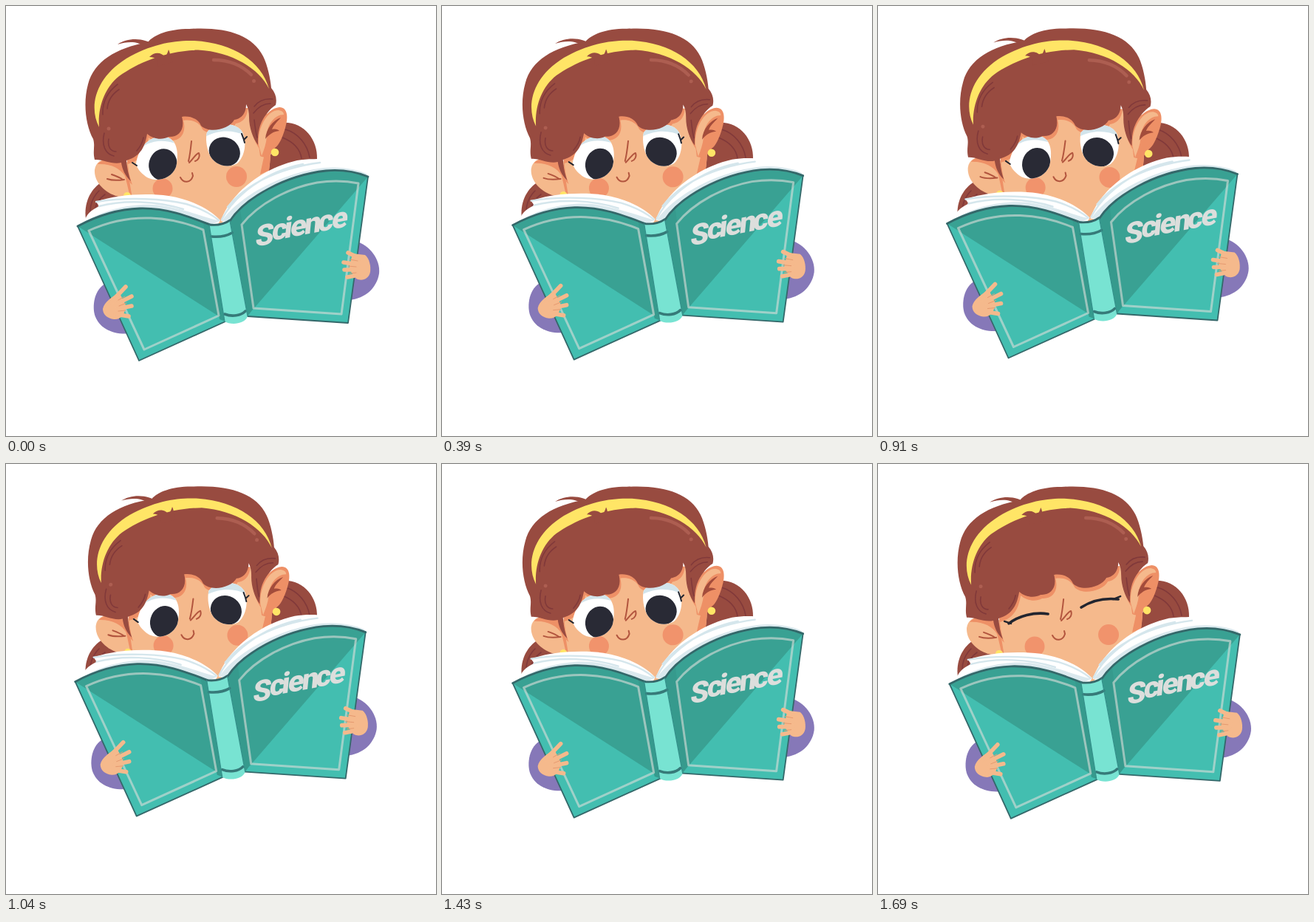
An HTML page that plays this animation: 582x582 px, repeating every 1.82 s.

```html
<!DOCTYPE html>
<html lang="en">
<head>
<meta charset="utf-8">
<title>Reading girl</title>
<style>
  html, body { margin: 0; width: 100%; height: 100%; overflow: hidden; background: #fff; }
  svg { display: block; width: 100vw; height: 100vh; }
  .hair { fill: #984b40; }
  .skin { fill: #f5b98c; }
  .shade { fill: #ee9066; }
  .yellow { fill: #ffe566; }
  .ink { fill: #292a35; }
  .sleeve { fill: #8678b8; }
  .bright { fill: #43beb0; }
  .dark { fill: #39a193; }
  .hinge { fill: #369a8d; }
  .line { fill: none; stroke-linecap: round; stroke-linejoin: round; }
  .strand { stroke: #81393a; stroke-width: 1.6; }
  .feature { stroke: #b2553e; stroke-width: 2; }
  .lash { stroke: #22252f; stroke-width: 3.6; }
  .edge { stroke: #34686a; stroke-width: 2.8; }
  .frame { stroke: #d8ded8; stroke-opacity: .62; stroke-width: 3; }
  .page { stroke: #d5e6ec; stroke-width: 2.4; }
  .finger { stroke: #f5b98c; stroke-width: 5.6; }
  .gap { stroke: #e59a70; stroke-width: 1; }
  text { font: 800 40px Roboto, "Open Sans", sans-serif; font-stretch: 75%; fill: #dcdedc; }
</style>
</head>
<body>
<svg viewBox="0 0 582 582">
  <defs>
    <path id="face" d="M163 200 C165 225 168 245 172 264 L290 296 L356 222 C360 195 358 165 352 140 L200 130Z"/>
    <path id="hair" d="M120 208 C117 196 121 190 118 180 C108 162 104 132 111 106 C119 75 148 57 192 49
      C200 39 220 31 248 31 C296 28 333 38 348 68 C354 80 358 99 359 111 C365 118 367 126 365 134
      C357 139 348 150 345 162 C342 171 341 180 341 188 C334 179 329 164 329 151 C329 144 328 138 325 133
      C325 148 316 153 309 154 C302 167 275 173 264 162 C260 152 248 148 238 150
      C243 168 233 178 220 177 C211 182 199 180 191 173 C188 190 183 203 163 209
      C164 221 166 229 169 237 C161 230 157 220 156 212 C143 215 131 207 120 208Z"/>
    <clipPath id="faceClip"><use href="#face"/></clipPath>
    <path id="eyeL" d="M176 214 C179 192 194 174 215 177 C231 179 235 198 230 218 C223 236 199 240 187 229 C181 224 178 220 176 214Z"/>
    <path id="eyeR" d="M272 171 C284 157 311 156 320 171 C327 187 322 205 313 213 C299 221 281 215 275 200 C271 190 270 179 272 171Z"/>
    <clipPath id="clipL"><use href="#eyeL"/></clipPath>
    <clipPath id="clipR"><use href="#eyeR"/></clipPath>
    <path id="coverL" d="M97 298 C123 284 151 275 181 274 C219 273 250 286 276 296 L297 427 L180 480Z"/>
    <path id="coverR" d="M303 291 C323 260 378 229 433 223 C456 221 475 225 490 231 L463 429 L327 420Z"/>
    <clipPath id="cutL"><use href="#coverL"/></clipPath>
    <clipPath id="cutR"><use href="#coverR"/></clipPath>
  </defs>

  <!-- pigtails -->
  <path class="hair" d="M372 158 C402 155 422 180 421 207 L345 226 L362 194Z"/>
  <path class="line strand" d="M378 167 C396 172 408 188 411 205 M374 178 C389 184 398 194 400 206"/>
  <path class="hair" d="M130 238 C115 247 105 266 108 288 L176 268 L160 246Z"/>
  <path class="line strand" d="M126 250 C117 259 114 268 114 278 M134 255 C126 261 122 267 121 274"/>

  <g id="head">
    <path class="skin" d="M168 213 C148 204 122 203 120 222 C119 240 136 254 152 258 L174 262Z"/>
    <path class="shade" d="M166 217 C150 206 130 205 124 214 C142 213 155 220 161 230 C165 244 166 253 169 259 L174 260Z"/>
    <path class="line feature" d="M137 234 C145 237 153 236 160 235 M143 228 C149 230 154 232 158 235"/>
    <circle class="yellow" cx="164" cy="257" r="5"/>
    <use href="#face" class="skin"/>
    <g clip-path="url(#faceClip)">
      <use href="#hair" class="shade" transform="translate(2 5)"/>
      <path class="shade" d="M352 184 C351 199 347 212 344 228 L362 220 L362 180Z"/>
    </g>
    <circle cx="212" cy="247" r="13.5" fill="#f1936c"/>
    <circle cx="312" cy="231" r="14" fill="#f1936c"/>

    <g id="open">
      <use href="#eyeL" fill="#fff"/>
      <g clip-path="url(#clipL)">
        <path d="M174 200 C190 182 210 178 236 188 L236 168 L174 168Z" fill="#d2e4eb"/>
        <ellipse class="ink" cx="212.5" cy="214.5" rx="19" ry="21.5" transform="rotate(14 212 214)"/>
      </g>
      <use href="#eyeR" fill="#fff"/>
      <g clip-path="url(#clipR)">
        <path d="M268 178 C284 168 306 166 325 176 L325 152 L268 152Z" fill="#d2e4eb"/>
        <ellipse class="ink" cx="296" cy="197.5" rx="21.5" ry="19.5" transform="rotate(28 296 197)"/>
      </g>
      <path class="line lash" style="stroke-width:2" d="M171 212 L177 216 M319 173 Q322 180 323 185 M322 181 L326 177"/>
    </g>
    <g id="shut">
      <path class="line lash" d="M177 216 C190 206 211 200 230 203 M275 194 C289 185 307 181 325 183"/>
      <path class="line lash" style="stroke-width:2.4" d="M171 213 L180 216 M318 183 L328 179"/>
    </g>

    <path class="line feature" d="M251 183 C250 193 249 202 247 210 M248 212 C254 206 257 200 261 199 C263 204 260 209 256 210"/>
    <path class="line feature" d="M236 232 C240 240 250 240 253 230 L252 226"/>

    <use href="#hair" class="hair"/>
    <path class="hair" d="M151 52 C164 43 187 42 202 54 L188 55 C178 47 164 48 151 52Z"/>
    <path class="yellow" d="M126 164 C112 137 120 98 163 71 C197 51 229 46 255 47 C308 50 346 75 356 112 C343 85 306 62 260 59.5 C215 61 178 77 153 95 C133 111 124 138 126 164Z"/>
    <path class="hair" d="M194 69 C201 61 211 63 215 69 C217 67 219 63 220 59 C223 64 221 69 226 76 L204 82 C207 74 203 69 194 69Z"/>
    <path class="line strand" d="M131 147 C130 130 138 116 151 106 M137 139 C138 128 144 119 153 113
      M133 172 C129 188 134 200 146 203 M139 180 C137 191 142 197 149 197 M177 196 C182 190 185 185 186 178
      M336 136 C342 128 351 125 361 126 M335 145 C342 136 350 132 358 132 M336 154 C337 164 338 171 340 178"/>
    <circle cx="139" cy="166" r="2.5" fill="#ad5e51"/>
    <path class="line" d="M281 73 C302 73 320 81 332 93" stroke="#ad5e51" stroke-width="4.5"/>
    <circle cx="335.5" cy="101.5" r="2.5" fill="#ad5e51"/>

    <path class="shade" d="M342 188 C338 164 351 139 370 137 C382 137 382 152 378 165 C374 179 369 189 364 192 C360 202 350 207 344 203Z"/>
    <path class="skin" d="M342 188 C340 166 353 141 369 141 C374 142 376 144 376 147 C364 147 353 160 353 177 C352 187 349 195 346 203Z"/>
    <path d="M351 180 C352 166 361 155 372 151 C366 158 362 161 360 167 C365 166 368 167 370 169 C361 170 356 174 351 180Z" fill="#a34c3b"/>
    <circle class="yellow" cx="364" cy="198" r="5.3"/>
  </g>

  <g id="book">
    <path class="sleeve" d="M139 374 C121 379 116 403 120 418 C126 437 146 446 170 443 L165 400Z"/>
    <path class="sleeve" d="M472 318 C492 323 507 343 505 362 C502 381 487 396 464 398Z"/>

    <!-- pages -->
    <path d="M107 291 C108 283 114 277 126 271 L122 265 C150 255 190 253 220 257 C251 262 276 275 290 290 L284 300 L180 282Z" fill="#fff"/>
    <path d="M107 292 C135 274 180 264 216 271 C245 276 268 286 289 291 L276 297 C240 281 205 272 181 274 C151 275 130 281 107 292Z" fill="#dbe9ee"/>
    <path class="line page" d="M122 265 C165 258 215 261 244 268 C264 274 278 282 288 290 M126 271 C160 262 205 264 240 275"/>
    <path d="M291 291 C299 263 337 222 394 209 C431 203 466 214 487 225 L489 232 L440 226 L303 294Z" fill="#fff"/>
    <path d="M292 291 C315 258 372 226 430 219 C454 217 475 221 488 227 L489 232 C470 224 450 221 433 223 C378 229 323 260 303 291Z" fill="#dbe9ee"/>
    <path class="line page" d="M292 289 C308 258 350 224 402 214 M300 272 C322 244 365 220 425 212"/>

    <!-- left cover -->
    <use href="#coverL" class="bright"/>
    <g clip-path="url(#cutL)">
      <path class="dark" d="M97 298 L296 425 L310 260 L97 260Z"/>
      <path class="hinge" d="M266 288 L276 296 L297 427 L289 424Z"/>
    </g>
    <path class="line frame" d="M112 304 C138 292 168 286 196 287 C225 288 248 295 267 303 L288 419 L187 465Z"/>
    <path class="line edge" d="M276 296 C250 286 219 273 181 274 C151 275 123 284 97 298"/>
    <path class="line edge" style="stroke-width:1.8" d="M97 298 L180 480 L297 427"/>

    <!-- right cover -->
    <use href="#coverR" class="bright"/>
    <g clip-path="url(#cutR)">
      <path class="dark" d="M490 231 L328 418 L290 420 L290 200 L490 200Z"/>
      <path class="hinge" d="M303 291 L317 275 L335 408 L327 420Z"/>
    </g>
    <path class="line frame" d="M319 296 C342 267 383 246 421 239 C442 236 462 237 477 240 L454 417 L335 409Z"/>
    <path class="line edge" d="M303 291 C323 260 378 229 433 223 C456 221 475 225 490 231"/>
    <path class="line edge" style="stroke-width:1.8" d="M490 231 L463 429 L327 420"/>
    <text transform="matrix(1 -.19 -.1 1 337 322)" x="0 22 38.5 47 66 84.5 103" y="4 0">Science</text>

    <!-- spine -->
    <path d="M275 296 C285 297 296 295 303 290 L327 420 C323 431 304 432 296 427Z" fill="#78e3d2"/>
    <path class="line edge" d="M275 296 C285 297 296 295 303 290"/>
    <path class="line" d="M278 312 C288 313 299 311 306 307 M296 417 C306 421 318 419 324 413" stroke="#367a79" stroke-width="3.6"/>
    <path class="line" d="M275 296 L296 427 M303 291 L327 420" stroke="#34908a" stroke-width="1.2"/>

    <!-- hands -->
    <path class="skin" d="M131 410 C133 400 144 394 153 387 L162 405 C162 417 155 425 146 424 C138 423 131 418 131 410Z"/>
    <path class="line finger" d="M142 401 L162 380 M148 404 L170 393 M150 410 L170 406 M148 417 L166 420"/>
    <path class="line gap" d="M152 398 L161 393 M153 406 L163 402 M152 413 L162 412"/>
    <path class="skin" d="M469 335 L486 337 C492 342 494 352 493 360 C491 370 481 373 474 369 L464 356Z"/>
    <path class="line finger" d="M480 342 L463 334 M477 350 L457 347 M476 357 L458 357 M477 364 L462 367"/>
    <path class="line gap" d="M476 345 L465 343 M474 353 L463 352 M474 361 L465 362"/>
  </g>
</svg>
<script>
  const LOOP = 1820, STEP = 130, COUNT = LOOP / STEP;
  const el = id => document.getElementById(id);
  const head = el('head'), book = el('book'), open = el('open'), shut = el('shut');
  const start = performance.now();

  function draw(ms) {
    const pose = Math.floor((ms % LOOP) / STEP);
    const sway = (1 - Math.cos(2 * Math.PI * pose / COUNT)) / 2;
    const blink = pose === COUNT - 1;
    head.setAttribute('transform', `translate(0 ${-0.8 * sway}) rotate(${1.25 * sway} 235 300)`);
    book.setAttribute('transform', `translate(${-3.5 * sway} ${-3.5 * sway})`);
    open.setAttribute('display', blink ? 'none' : 'inline');
    shut.setAttribute('display', blink ? 'inline' : 'none');
  }

  function tick() {
    draw(performance.now() - start);
    requestAnimationFrame(tick);
  }
  draw(0);
  requestAnimationFrame(tick);
</script>
</body>
</html>
```
